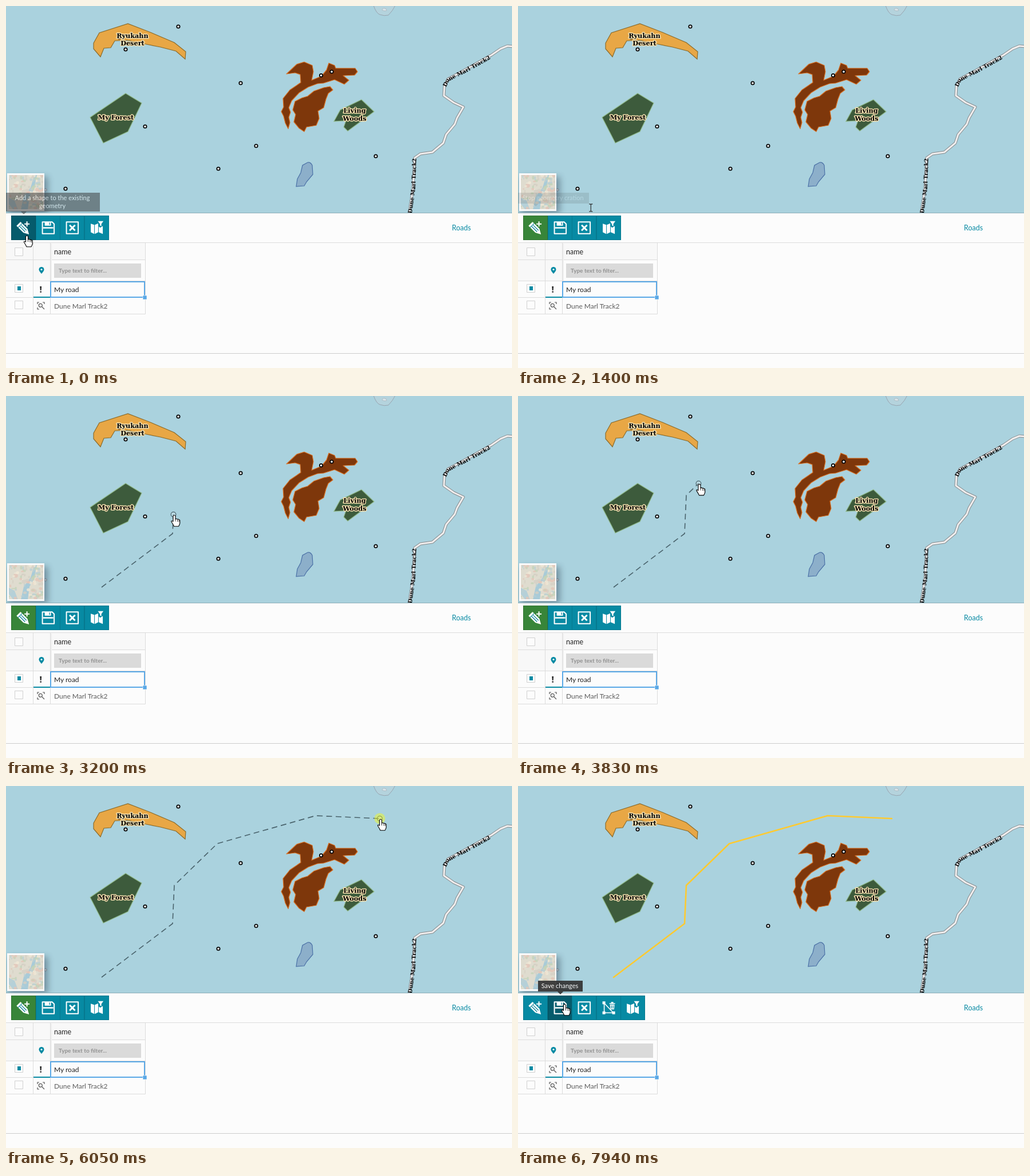
Recreate the animation shown at these times as an HTML page. Size 884 by 634 pixels, loop 8000 ms.

```html
<!DOCTYPE html>
<html lang="en">
<head>
<meta charset="utf-8">
<title>Drawing a road on a map</title>
<style>
html, body { margin: 0; width: 100%; height: 100%; overflow: hidden; background: #fcfcfc; }
svg { display: block; width: 100vw; height: 100vh; font-family: Lato, "Open Sans", sans-serif; }
.label { font: bold 11.3px "DejaVu Serif", serif; text-anchor: middle; paint-order: stroke;
  stroke: #f3dfae; stroke-width: 3px; stroke-linejoin: round; }
.road-name { font: bold 9.5px "DejaVu Serif", serif; }
.grid { stroke: #dcdcdc; fill: none; }
.icon { fill: none; stroke: #fff; stroke-width: 2; stroke-linejoin: round; }
.solid { fill: #fff; stroke: none; }
.cut { stroke: #087f96; stroke-width: 1.2; }
.tip { font-size: 11px; fill: #fff; text-anchor: middle; }
.tip path { fill: #333; }
</style>
</head>
<body>
<svg viewBox="0 0 884 634" preserveAspectRatio="none">
<defs>
  <filter id="soft" x="-50%" y="-50%" width="200%" height="200%"><feGaussianBlur stdDeviation="6"/></filter>
  <clipPath id="mapClip"><path d="M0 0H884V362H0Z"/></clipPath>
  <clipPath id="thumbClip"><path d="M5 296H65V356H5Z"/></clipPath>
  <path id="upper" d="M766 141L772 129L800 115L838 94L856 83"/>
  <path id="lower" d="M706 363L712 320L714 262"/>
  <path id="road" d="M886 71L876 70L864 75L848 86L800 113L772 128L766 141L765 157L782 169L799 177L788 196L784 207L769 225L764 240L745 256L724 259L714 266L711 320L704 366"/>
  <g id="zoom" fill="none" stroke="#555" stroke-width="1.2">
    <path d="M-6 -3V-6H-3M3 -6H6V-3M-6 3V6H-3M1.5 1.5L6 6"/><circle cx="-.7" cy="-.7" r="3"/>
  </g>
</defs>

<rect width="884" height="634" fill="#fcfcfc"/>
<g clip-path="url(#mapClip)">
  <rect width="884" height="362" fill="#aad2de"/>
  <path d="M642 -1Q647 13 653 15Q661 18 668 16Q676 8 680 -1" fill="#b4d3dd" stroke="#98a4b0"/>
  <path d="M657 7Q658 3 661 4Q665 4 665 8Q661 10 657 7Z" fill="#d5e4e9" stroke="#a9b4bc" stroke-width=".8"/>
  <path d="M153 65L163 47L213 31L252 46L294 64L314 80L313 93L297 79L270 72L240 66L212 60L190 61L183 73L171 74L165 89L153 75Z" fill="#e8a745" stroke="#8b6c2c" stroke-width="1.2"/>
  <g fill="#3d5b3c" stroke="#8fb98a" stroke-width="1.2">
    <path d="M209 153L237 170L213 220L170 240L147 195Z"/>
    <path d="M573 202L584 182L621 164L643 185L616 205L597 219L590 212L594 201Z"/>
  </g>
  <g fill="#7e370b" stroke="#d96f22" stroke-width="1.2" stroke-linejoin="round">
    <path d="M490 119L508 102L521 98L535 104L537 115L534 130L551 123L560 112L564 100L574 104L576 109L610 109L614 115L609 121L589 122L599 130L591 137L574 129L555 135L544 136L528 142L512 152L499 166L494 178L497 186L494 195L496 204L493 215L488 205L485 193L481 185L485 177L484 162L496 147L515 134L514 120L505 117Z"/>
    <path d="M566 141L571 147L563 153L559 163L555 178L545 184L547 197L542 209L525 212L521 220L512 214L503 203L506 190L501 182L505 167L517 161L527 158L538 149L555 143Z"/>
  </g>
  <path d="M527 274Q532 273 535 279L536 295L525 308L521 315L507 316L509 303L515 292L518 279Z" fill="#8cafca" stroke="#4b71a6" stroke-width="1.2"/>
  <g fill="none" stroke-linejoin="round">
    <use href="#road" stroke="#868b8e" stroke-width="5"/>
    <use href="#road" stroke="#f0eeee" stroke-width="3"/>
  </g>
  <text class="road-name" dy="3"><textPath href="#upper">Dune Marl Track2</textPath></text>
  <text class="road-name" dy="3"><textPath href="#lower">Dune Marl Track2</textPath></text>
  <g id="points" fill="#fff" stroke="#000" stroke-width="1.7"></g>
  <text class="label" x="221" y="56">Ryukahn</text>
  <text class="label" x="221" y="69">Desert</text>
  <text class="label" x="192" y="199">My Forest</text>
  <text class="label" x="609" y="187">Living</text>
  <text class="label" x="609" y="201">Woods</text>
  <g fill="none" stroke-linejoin="round">
    <polyline id="sketch" stroke="#4a636c" stroke-width="1.6" stroke-dasharray="10 6.4"/>
    <polyline id="done" stroke="#fdca32" stroke-width="2.6" stroke-linecap="round"/>
    <circle id="node" r="4.3" stroke="#4a636c" stroke-width="1.2" fill="#fff" fill-opacity=".2"/>
  </g>
  <circle cx="69" cy="322" r="2.2" fill="#dce8ec" stroke="#8c989e"/>
  <rect x="5" y="299" width="68" height="65" fill="#234" opacity=".42" filter="url(#soft)"/>
  <rect x="2" y="293" width="65" height="66" fill="#fafafa"/>
  <g clip-path="url(#thumbClip)">
    <rect x="5" y="296" width="60" height="60" fill="#dfdccf"/>
    <path d="M26 357L31 334L43 318L50 295H54L49 320L41 334L38 357Z" fill="#a9cbd8"/>
    <path d="M5 336L15 341L21 357H13L5 347Z" fill="#b5d0d8"/>
    <g id="patches"></g>
  </g>
</g>
<path d="M0 362.5H884" stroke="#8daeb8"/>

<rect y="415" width="243" height="29" fill="#f8f8f8"/>
<rect y="444" width="78" height="38" fill="#f8f8f8"/>
<path class="grid" d="M0 414.500H884M0 444.500H243M0 481.500H243M0 510.500H243M0 539.500H243.500V415M47.500 415V540M77.500 415V540"/>
<path d="M79 416V481" stroke="#eee" stroke-width="2"/>
<path d="M0 608.500H884" stroke="#ccc"/>
<path d="M15.500 423.500h14v14h-14zM15.500 487.500h14v14h-14zM15.500 516.500h14v14h-14z" fill="#fcfcfc" stroke="#d0d0d0"/>
<path d="M20 491h6v7h-6z" fill="#078aa3"/>
<path d="M62 469Q57.500 464 57.500 461.500A4.500 4.500 0 0 1 66.500 461.500Q66.500 464 62 469Z" fill="#078aa3"/>
<circle cx="62" cy="461.500" r="1.6" fill="#fff"/>
<rect x="84" y="451" width="152" height="25" fill="#dadada"/>
<text x="92" y="467" font-size="10" font-weight="bold" fill="#929292">Type text to filter...</text>
<text x="84" y="435" font-size="12.5" fill="#222">name</text>
<text x="84" y="501" font-size="12" fill="#222">My road</text>
<text x="84" y="530" font-size="12" fill="#5c5c5c">Dune Marl Track2</text>
<text x="779" y="393" font-size="12.5" fill="#078aa3">Roads</text>
<path d="M48 510H77" stroke="#078aa3" stroke-width="2"/>
<rect x="78" y="483" width="164" height="27" fill="none" stroke="#59a8e6" stroke-width="2"/>
<path d="M239 507h7v7h-7z" fill="#59a8e6" stroke="#fff" stroke-width=".6"/>
<path id="alert" d="M59.300 491h2.800l-.5 7h-1.800zM59.500 499.500h2.400v2.300h-2.400z" fill="#222"/>
<use id="zoomNew" href="#zoom" x="61" y="496"/>
<use href="#zoom" x="61" y="525"/>

<g id="buttons"></g>

<g id="tips"></g>

<circle id="click" r="9.5" fill="#ff0" fill-opacity=".42"/>
<g id="hand"><g transform="translate(1.5 1.2)">
  <path d="M-2 1.500Q0 -1.500 2 1.500V7Q4 5.500 5.500 7.400Q7.500 6.300 8 8.300Q10 7.600 9.800 10V14Q9.300 17 7.500 19.500H-.5Q-2 16 -5 11.500Q-5.500 8.800 -2 11Z" fill="#fff" stroke="#000" stroke-width="1.1" stroke-linejoin="round"/>
  <path d="M2 7V11M5.500 8V11.500M8 9V12" stroke="#000" stroke-width=".8"/>
</g></g>
<path id="beam" d="M-3 -6.500H-1L0 -5.500L1 -6.500H3M0 -5.500V5.500M-3 6.500H-1L0 5.500L1 6.500H3" fill="none" stroke="#222" stroke-width="1.1"/>
</svg>

<script>
const LOOP = 8000, FINISH = 6520, TEAL = '#078aa3', DARK = '#055b6c';
const $ = id => document.getElementById(id);
const show = (id, on) => $(id).setAttribute('visibility', on ? 'visible' : 'hidden');
const place = (id, [x, y]) => $(id).setAttribute('transform', `translate(${x} ${y})`);

// Point features
$('points').innerHTML = [
  [301, 36], [198, 55], [209, 76], [410, 135], [243, 211], [437, 245], [371, 285],
  [104, 320], [646, 263], [550.5, 121.5], [569, 115]
].map(([x, y]) => `<circle cx="${x}" cy="${y}" r="2.7"/>`).join('');

// Mottled land of the basemap preview
let seed = 7;
const rnd = () => (seed = seed * 16807 % 2147483647) / 2147483647;
$('patches').innerHTML = Array.from({ length: 110 }, (_, i) => {
  const fill = ['#c3d3b8', '#e3c5b8', '#efe7d6', '#bccfd3', '#d5cfc4'][i % 5];
  return `<ellipse cx="${5 + rnd() * 60}" cy="${296 + rnd() * 60}" rx="${1 + rnd() * 3}" ry="${1 + rnd() * 2.5}" fill="${fill}" opacity=".8"/>`;
}).join('');

// Toolbar, icons drawn around each button's centre
const icons = {
  draw: '<g transform="translate(-1 1) rotate(45)"><path class="solid" d="M-11 -5H6L15 0L6 5H-11Z"/><path class="cut" d="M-7 -5V5M-6 -1.700H7M-6 1.700H7"/></g><path d="M6 -11V-2M1.500 -6.500H10.500"/>',
  save: '<path d="M-10 -10H7L10.500 -6.500V10.500H-10Z"/><path class="solid" d="M-6 -10H5V-3.500H-6ZM-9 -1H9V1.500H-9Z"/><path class="cut" d="M2.500 -9V-5" stroke-width="2"/>',
  cancel: '<path d="M-10 -10H10.500V10.500H-10Z"/><path d="M-4.500 -4.500L5 5M5 -4.500L-4.500 5" stroke-width="3"/>',
  erase: '<path d="M-8 -8V9H8L-8 -8" stroke-width="1.6"/><path class="solid" d="M-11 -11h5v5h-5zM-11 6.500h5v5h-5zM6 6.500h5v5h-5zM1 -8H11V-6.500H1ZM4 -10H8V-8H4ZM2 -5.500H10L9.300 3H2.700Z"/><path class="cut" d="M4.500 -4V1.500M7.500 -4V1.500"/>',
  filter: '<path class="solid" d="M-10.500 -7L-4.500 -5V11L-10.500 8ZM-3.500 -5L2.500 -7.500V8L-3.500 11ZM3.500 -2L6 0L10.500 -3V11L3.500 8ZM2 -11.500H11.500L8 -6.500V-2.500L5.500 -4V-6.500Z"/>'
};
const slot = i => 9 + Math.round(i * 42.6);
const button = (name, i) => `<g id="${name}" transform="translate(${slot(i)} 367)">
  <rect width="43" height="43" fill="${TEAL}"/>
  <path d="M.5 .5H42.500V42.500H.5Z" fill="none" stroke="#000" stroke-opacity=".12"/>
  <g class="icon" transform="translate(21.6 21.3)">${icons[name]}</g></g>`;
$('buttons').innerHTML = ['draw', 'save', 'cancel', 'erase', 'filter'].map(button).join('');
const tint = (name, color) => $(name).querySelector('rect').setAttribute('fill', color);

// Tooltips
const tip = (id, x, y, w, h, arrow, lines) => `<g id="${id}" class="tip">
  <path d="M${x} ${y}h${w}v${h}H${arrow + 5}l-5 5l-5 -5H${x}Z"/>
  ${lines.map((s, i) => `<text x="${x + w / 2 - 1}" y="${y + 13 + i * 14}">${s}</text>`).join('')}</g>`;
$('tips').innerHTML =
  tip('tipAdd', 0, 327, 164, 33, 31, ['Add a shape to the existing', 'geometry']) +
  tip('tipStop', 0, 327, 124, 19, 31, ['Stop geometry cration']) +
  tip('tipSave', 35, 341, 78, 19, 74, ['Save changes']);

// Hard-stepped value: the last entry whose time has come
const stage = (t, steps) => steps.reduce((v, [at, next]) => t >= at ? next : v, steps[0][1]);

const linear = p => p;
const out = p => 1 - (1 - p) ** 3;
const inOut = p => p * p * (3 - 2 * p);

// Pointer moves: first step, last step, step count, target, easing
const moves = [
  [80, 150, 2, 33, 397, linear],
  [1310, 1780, 6, 167, 335, out],
  [2010, 2410, 6, 291, 241, linear],
  [2940, 3500, 8, 294, 174, linear],
  [3730, 4210, 7, 369, 101, linear],
  [4430, 4830, 6, 541, 52, linear],
  [5190, 5670, 7, 653, 57, linear],
  [7080, 7080, 1, 616, 102, linear],
  [7160, 7640, 7, 80, 381, inOut]
];
function pointer(t) {
  let x = 35, y = 401;
  for (const [from, to, n, tx, ty, ease] of moves) {
    if (t < from) break;
    const span = (t - from) / Math.max(1, to - from);
    const p = ease(Math.min(n, Math.floor(span * (n - 1) + .05) + 1) / n);
    x += (tx - x) * p;
    y += (ty - y) * p;
  }
  return [x, y];
}

const vertices = moves.slice(1, 7).map(m => [m[3], m[4]]);
const vertexTimes = [1860, 2640, 3580, 4280, 5040, 6050];
const clicks = [[320, 390], [1860, 2010], [2640, 2790], [3580, 3730], [4280, 4430],
  [5040, 5190], [6050, 6130], [6200, 6370]];
$('done').setAttribute('points', vertices.join(' '));

function draw(t) {
  const pos = pointer(t), finished = t >= FINISH;
  const beam = t >= 1310 && t < 1480;
  for (const id of ['hand', 'beam', 'click', 'node']) place(id, pos);
  show('hand', !beam);
  show('beam', beam);
  show('click', clicks.some(([a, b]) => t >= a && t < b));

  const fixed = vertices.filter((_, i) => t >= vertexTimes[i]);
  $('sketch').setAttribute('points', [...fixed, pos].join(' '));
  show('sketch', t >= vertexTimes[0] && !finished);
  show('node', t >= 1480 && !finished);
  show('done', finished);
  show('alert', !finished);
  show('zoomNew', finished);

  show('erase', finished);
  place('filter', [slot(finished ? 4 : 3), 367]);
  tint('draw', stage(t, [[0, DARK], [320, '#1b6552'], [390, '#2d7031'], [1310, '#388539'], [FINISH, TEAL]]));
  tint('save', stage(t, [[0, TEAL], [7560, '#06707f'], [7640, DARK]]));

  $('tipAdd').setAttribute('opacity', stage(t, [[0, .5], [80, .75], [150, .9], [550, 0]]));
  $('tipStop').setAttribute('opacity', stage(t, [[0, 0], [550, .9], [1310, .5], [1390, .12], [1480, 0]]));
  $('tipSave').setAttribute('opacity', stage(t, [[0, 0], [7700, .4], [7790, .7], [7870, .92]]));
}

function frame() {
  draw(performance.now() % LOOP);
  requestAnimationFrame(frame);
}
frame();
</script>
</body>
</html>
```
